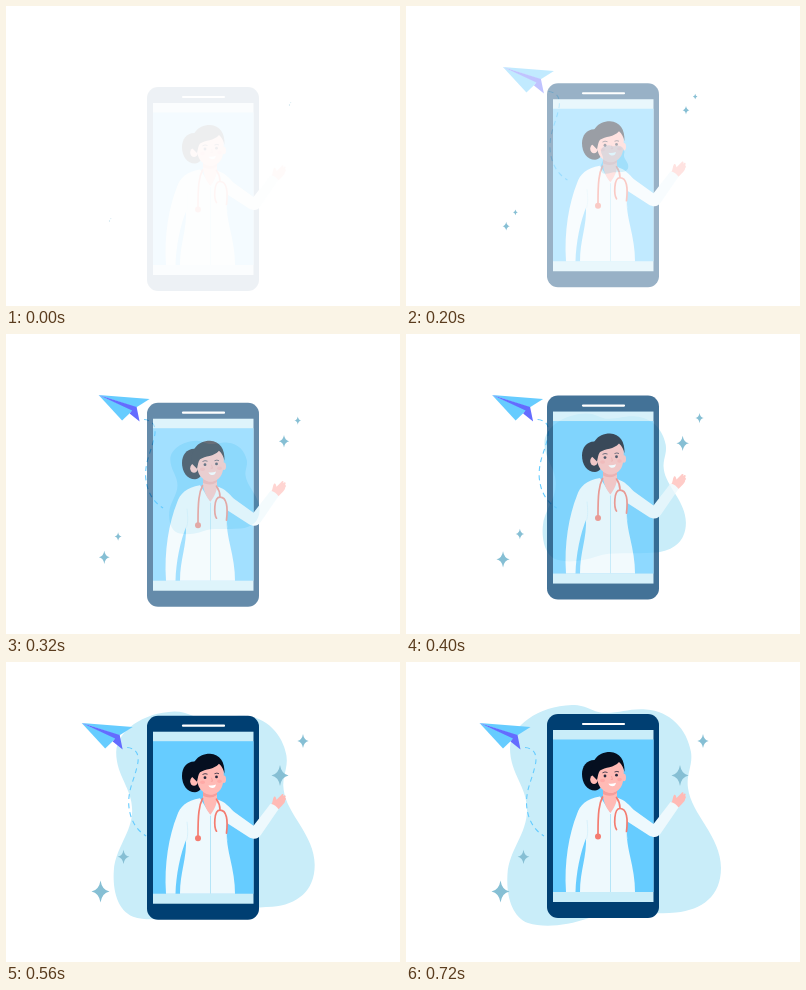
An HTML page that plays this animation: 394x300 px, repeating every 1560 ms.

```html
<!DOCTYPE html>
<html lang="en">
<head>
<meta charset="utf-8">
<title>Online doctor</title>
<style>
  html, body { margin: 0; width: 100%; height: 100%; overflow: hidden; background: #fff; }
  svg { display: block; width: 100vw; height: 100vh; }
</style>
</head>
<body>
<svg viewBox="0 0 394 300" preserveAspectRatio="xMidYMid meet">
  <defs>
    <path id="spark" d="M0-11Q1.5-1.5 9 0Q1.5 1.5 0 11Q-1.500 1.5-9 0Q-1.500-1.5 0-11Z"/>
  </defs>

  <path id="blob" fill="#c9edf9" d="M104 86C105 64 132 44 166 43C182 43 187 51 200 51C216 51 222 46.500 240 47.500C264 49 281 67 285 90C287 104 280 112 282 126C285 152 315 174 315 206C315 234 296 248 270 250.500C234 253 203 249 183 256C160 264 138 266 122 261C106 255 100 234 101.500 212C103 188 121 172 121 148C121 124 104 112 104 86Z"/>

  <g id="plane">
    <path d="M119 85.500C128 86 132 93 129 104C126 118 120.500 126 120.500 141C121 157 128 168 138 174" fill="none" stroke="#66ccff" stroke-width="1.100" stroke-dasharray="5 4"/>
    <path d="M73.500 61L124.500 65L111 73.500Z" fill="#66ccff"/>
    <path d="M73.500 61L108 76L97 86.500Z" fill="#66ccff"/>
    <path d="M73.500 61L111.500 73L114.500 87.500L104.500 79.500L107 76.500Z" fill="#646cff"/>
  </g>

  <g id="call">
    <rect x="141" y="52" width="112" height="204" rx="11" fill="#003f72"/>
    <path d="M177 62H218" stroke="#fff" stroke-width="2.200" stroke-linecap="round"/>
    <rect x="147" y="68" width="100.500" height="172" fill="#c9edf9"/>
    <rect x="147" y="77.500" width="100.500" height="152.500" fill="#66ccff"/>

    <!-- hair bun -->
    <path d="M190 98C181 97 176 104 176 112C176 121 181 128.500 189 128.500C193 128.500 196 125 197 119Z" fill="#050f20"/>

    <!-- raised hand -->
    <path d="M265 141C267 139 266.500 135 268 133C269.500 132 270 134 270.500 136L276 130.500C277.500 130 278 131 277 132.500L278.500 131.500C280 131.500 280 133 279 134C280.500 134.500 280 136 279 137C279.500 138.500 277 141 273 145L269 147Z" fill="#ffbab5"/>

    <!-- coat -->
    <g fill="#eef9fd">
      <path d="M212 136C219 138 223 143 228 148L247.500 162L264.500 140C268 140.500 271 143 272.500 145.500L255 171C252 175.500 248 176 243 173.500L219 158Z"/>
      <path d="M194 134.500C180 137 174 143 171 152C163 172 158 200 160 230H169.500C170 212 174 190 181 174Z"/>
      <path d="M194 134.500L204 150L211 135.500C217 138 221 147 221 158C220 172 221 181 224 194C227 207 229 218 229 230H174C174 208 181 195 180 174L176 150Z"/>
    </g>
    <path d="M204.500 152V230" stroke="#b5e5f7" stroke-width="1"/>
    <path d="M181 158C182 167 182 172 180.500 177M221 155C220 164 220 171 221 177" fill="none" stroke="#d3effa" stroke-width=".8"/>

    <!-- neck and head -->
    <path d="M197 123V134C198 142 201 147 204.500 151C208 146 211 141 211 134V124Z" fill="#ffbab5"/>
    <path d="M197 128C202 132 207 132 211 128.500V131C206 135 201 134 197 132Z" fill="#f59e9b"/>
    <ellipse cx="188" cy="117.500" rx="3.800" ry="4.600" fill="#ffbab5"/>
    <ellipse cx="218" cy="115.500" rx="2" ry="3.800" fill="#ffbab5"/>
    <path d="M190 106C191 95 216 93 217.500 106C218.500 117 217 130 205.500 130.500C194 130.500 190 121 190 106Z" fill="#ffbab5"/>
    <path d="M186 113C184 100 191 90 204 90C214 90.500 219 98 218.500 110C217.500 106 216 102.500 213 100C208 106 199 105 194 108.500C192 111 192 114 191 118Z" fill="#050f20"/>
    <circle cx="199" cy="114" r="1.400" fill="#27283c"/>
    <circle cx="210.500" cy="113.200" r="1.400" fill="#27283c"/>
    <path d="M196.500 110.800Q199 109.200 201.500 110.500M208.500 110Q211 108.800 213 110" fill="none" stroke="#27283c" stroke-width=".8"/>
    <path d="M205.500 114L206.500 117.500H204.800" fill="none" stroke="#f59e9b" stroke-width=".8"/>
    <ellipse cx="196.500" cy="118.500" rx="2.500" ry="1.700" fill="#ffa9a6"/>
    <ellipse cx="213.500" cy="117.500" rx="2.300" ry="1.700" fill="#ffa9a6"/>
    <path d="M202.500 121.500Q206 122.300 210 120.800Q209.300 124.300 206.500 124.300Q203.300 124.300 202.500 121.500Z" fill="#fff"/>

    <!-- stethoscope -->
    <g fill="none" stroke="#f47c70" stroke-width="1.700" stroke-linecap="round">
      <path d="M196.500 135C193 142 192 150 192 172M210.500 135.500C213 139 214 142 214 146"/>
      <path d="M210.500 167.500C208 164 207.500 146.500 214 146.500C221 146.500 222 157 220.500 169.500"/>
    </g>
    <circle cx="192" cy="174.500" r="3" fill="#f47c70"/>
  </g>

  <g fill="#86bfd4">
    <g id="sparkR">
      <use href="#spark" transform="translate(274 113.500) scale(.95)"/>
      <use href="#spark" transform="translate(297 79) scale(.63)"/>
    </g>
    <g id="sparkL">
      <use href="#spark" transform="translate(94.500 229.500)"/>
      <use href="#spark" transform="translate(117.500 194.800) scale(.65)"/>
    </g>
  </g>
</svg>
<script>
  const LOOP = 1560, STEP = 40, END = 720;
  const el = id => document.getElementById(id);
  const [blob, plane, call, sparkR, sparkL] = ["blob", "plane", "call", "sparkR", "sparkL"].map(el);
  const clamp = v => Math.min(1, Math.max(0, v));

  // cubic-bezier(.54, 0, .4, 1), solved by bisection
  function ease(x) {
    if (x <= 0 || x >= 1) return clamp(x);
    let lo = 0, hi = 1, u = 0.5;
    for (let i = 0; i < 24; i++) {
      const v = 1 - u;
      const at = 3 * v * v * u * 0.54 + 3 * v * u * u * 0.4 + u * u * u;
      if (at < x) lo = u; else hi = u;
      u = (lo + hi) / 2;
    }
    return u * u * (3 - 2 * u);
  }

  function scaleAt(node, x, y, s) {
    node.setAttribute("transform", `translate(${x} ${y}) scale(${s}) translate(${-x} ${-y})`);
  }

  function draw(ms) {
    const t = Math.min(END, Math.floor(ms / STEP) * STEP);
    const grow = ease(t / END);
    const fade = clamp((t + 40) / 600);
    const glide = ease((t - 120) / 600);

    scaleAt(blob, 208.5, 153.5, grow);
    call.setAttribute("transform", `translate(0 ${29 * (1 - grow)})`);
    call.setAttribute("opacity", fade);
    plane.setAttribute("transform", `translate(${24 * (1 - glide)} 0)`);
    plane.setAttribute("opacity", clamp((t - 120) / 200));
    scaleAt(sparkR, 284, 98, fade);
    scaleAt(sparkL, 104, 214, fade);
  }

  const start = performance.now();
  function tick() {
    draw((performance.now() - start) % LOOP);
    requestAnimationFrame(tick);
  }
  tick();
</script>
</body>
</html>
```
